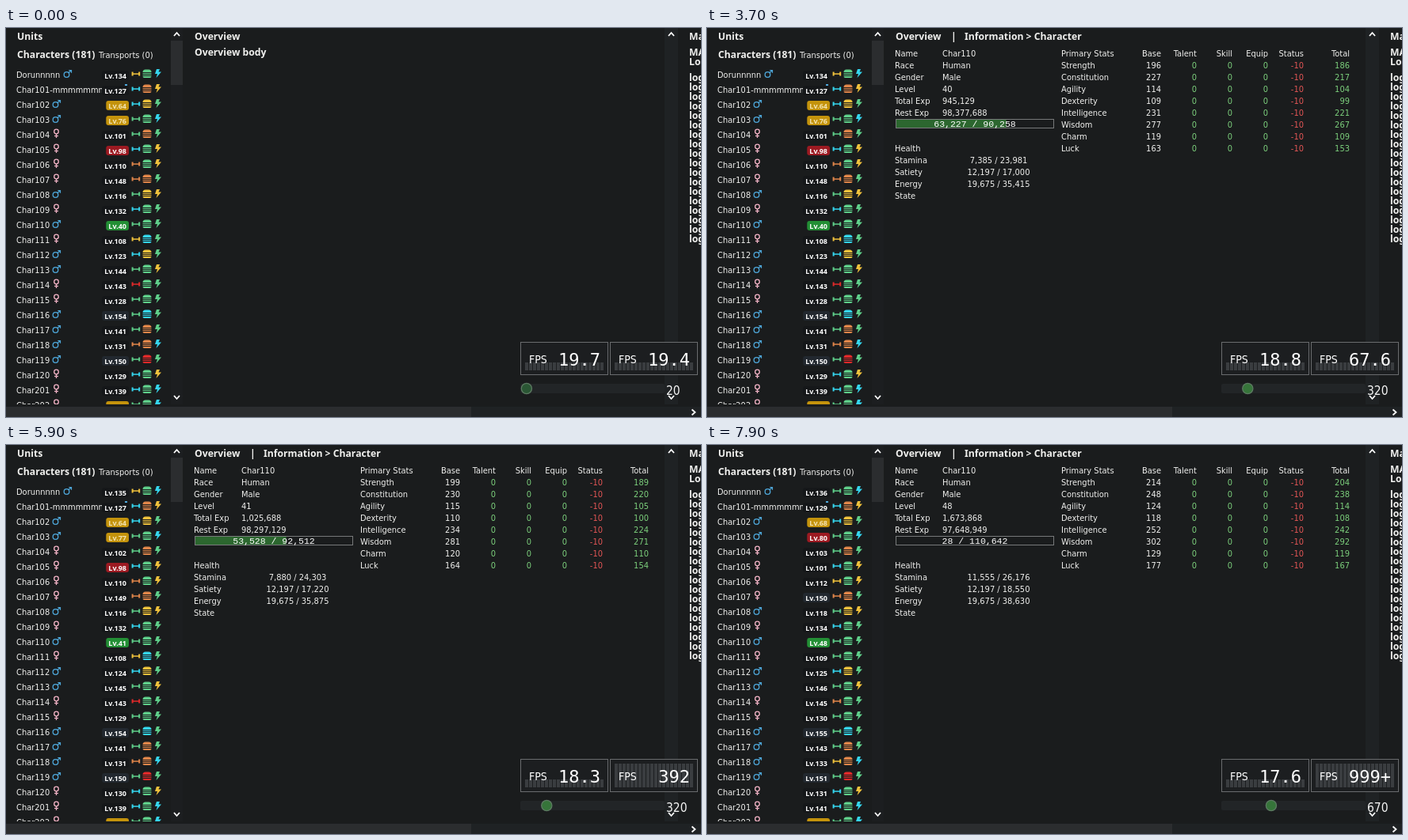
Recreate the animation shown at these times as an HTML page with a canvas. Size 877 px wide and 492 px high, loop 8 s.

```html
<!DOCTYPE html>
<html lang="en">
<head>
<meta charset="utf-8">
<title>Units overview</title>
<style>
html, body { margin: 0; width: 100%; height: 100%; overflow: hidden; background: #1a1c1d; }
canvas { display: block; }
</style>
</head>
<body>
<canvas id="stage" width="877" height="492"></canvas>
<script>
const ctx = document.getElementById('stage').getContext('2d', { alpha: false });
const LOOP = 8000, STEP = 100;
const BG = '#1a1c1d', TRACK = '#1f2224', THUMB = '#2b2d2f', LIGHT = '#f0f0ee';
const GREEN = '#7ccf7c', RED = '#e25555';
const SANS = '"DejaVu Sans Condensed", "Noto Sans", sans-serif';
const BODY = '11px ' + SANS;
const BOLD = 'bold 12.2px "Noto Sans", sans-serif';
const SMALL = 'bold 9px "Noto Sans", sans-serif';
const MONO = '22px "DejaVu Sans Mono", monospace';
const TINT = { g: '#5fcf8a', c: '#35d6ee', y: '#f0c23c', o: '#e0864a', r: '#e02a2a' };

// name, sex, level, level gains between tick keys, icon tints
const units = `Dorunnnnn m 134 1010 ygc
Char101-mmmmmmmmmm m 127 0011 coy
Char102 m 64 0022 cyg
Char103 m 76 1021 ggc
Char104 f 101 1010 gog
Char105 f 98 0021 cgy
Char106 f 110 0011 ogy
Char107 f 148 0101 oog
Char108 m 116 0011 gyy
Char109 f 132 0011 cgg
Char110 m 40 1043 ggg
Char111 f 108 0010 ycg
Char112 m 123 1010 cyg
Char113 m 144 0101 ggy
Char114 f 143 0011 rgg
Char115 f 128 1010 ggg
Char116 m 154 0010 gcg
Char117 m 141 0011 gog
Char118 m 131 0011 ooc
Char119 m 150 0010 grg
Char120 f 129 1010 cgy
Char201 f 139 0011 cgc
Char202 f 69 1011 ggc`.split('\n').map(line => {
  const [name, sex, level, gains, tints] = line.split(' ');
  let sum = +level;
  return { name, sex, tints, levels: [sum, ...[...gains].map(g => sum += +g)] };
});
const SELECTED = 10;
const rested = [[0, 120, 'ggc'], [6, 230, 'ygy'], [11, 230, 'ggg'], [14, 100, 'ogg'], [18, 110, 'yoc']]; // row, tick, tints

const tickTimes = [2800, 3300, 3700, 4600, 5900, 6300, 6700, 7200, 7900];
const tickCounts = [0, 1, 2, 15, 35, 41, 83, 165, 280];
const tickKeys = [0, 15, 35, 165, 280];
const expKeys = [940323, 976368, 1025688, 1358396, 1673868];
const START_EXP = 881902, ALL_EXP = 99322817;
const caps = [90258, 92512, 94800, 97000, 99260, 103733, 106000, 108375, 110642];
const levelKeys = [40, 41, 45, 48];
const stats = {
  Strength: [196, 199, 207, 214], Constitution: [227, 230, 240, 248],
  Agility: [114, 115, 120, 124], Dexterity: [109, 110, 115, 118],
  Intelligence: [231, 234, 244, 252], Wisdom: [277, 281, 293, 302],
  Charm: [119, 120, 125, 129], Luck: [163, 164, 172, 177]
};
const maxima = [[23981, 24303, 25334, 26176], [17000, 17220, 17955, 18550], [35415, 35875, 37405, 38630]];

function lerp(x, xs, ys) {
  if (x <= xs[0]) return ys[0];
  const i = xs.findIndex(k => x <= k);
  if (i < 0) return ys[ys.length - 1];
  return ys[i - 1] + (ys[i] - ys[i - 1]) * (x - xs[i - 1]) / (xs[i] - xs[i - 1]);
}
const round = (x, xs, ys) => Math.round(lerp(x, xs, ys));
const comma = n => n.toLocaleString('en-US');

function text(s, x, y, color = LIGHT, font = BODY, align = 'left') {
  ctx.font = font;
  ctx.textAlign = align;
  ctx.fillStyle = color;
  ctx.fillText(s, x, y);
}
function rect(x, y, w, h, color) {
  ctx.fillStyle = color;
  ctx.fillRect(x, y, w, h);
}
function rounded(x, y, w, h, r, color) {
  ctx.fillStyle = color;
  ctx.beginPath();
  ctx.roundRect(x, y, w, h, r);
  ctx.fill();
}
function trace(points, color, width) {
  ctx.strokeStyle = color;
  ctx.lineWidth = width;
  ctx.beginPath();
  points.forEach(([x, y], i) => i ? ctx.lineTo(x, y) : ctx.moveTo(x, y));
  ctx.stroke();
}
function ring(x, y, r, color) {
  ctx.strokeStyle = color;
  ctx.lineWidth = 1.3;
  ctx.beginPath();
  ctx.arc(x, y, r, 0, 7);
  ctx.stroke();
}
function frame(x, y, w, h, color) {
  ctx.strokeStyle = color;
  ctx.lineWidth = 1;
  ctx.strokeRect(x + .5, y + .5, w - 1, h - 1);
}
const chevron = (x, y, d) => trace([[x - 3.5, y - 2 * d], [x, y + 2 * d], [x + 3.5, y - 2 * d]], '#fff', 1.8);

function sexSign(sex, x, y) {
  if (sex === 'm') {
    const blue = '#4fa9dc';
    ring(x - 1, y + 1, 3.3, blue);
    trace([[x + 1.3, y - 1.3], [x + 5, y - 4.5]], blue, 1.3);
    trace([[x + 1.8, y - 4.5], [x + 5, y - 4.5], [x + 5, y - 1.3]], blue, 1.2);
  } else {
    const pink = '#f3b3c6';
    ring(x, y - 3, 2.8, pink);
    trace([[x, y], [x, y + 5]], pink, 1.3);
    trace([[x - 2.5, y + 2.5], [x + 2.5, y + 2.5]], pink, 1.2);
  }
}
function badge(level, y) {
  const label = 'Lv.' + level;
  const fill = level < 60 ? '#238f35' : level < 80 ? '#c4930c' : level < 100 ? '#9c1a22'
    : level < 150 ? '#151719' : '#22282f';
  ctx.font = SMALL;
  const w = ctx.measureText(label).width + 6;
  rounded(155 - w, y - 5, w, 12, 3, fill);
  text(label, 158 - w, y + 4.5, level >= 60 && level < 80 ? '#f3e3b0' : '#fff', SMALL);
}
function icons(tints, y) {
  const [bar, burger, bolt] = [...tints].map(k => TINT[k]);
  rect(160, y - 1.7, 8, 1.5, bar);
  rect(158.6, y - 3.5, 2, 5, bar);
  rect(167.2, y - 3.5, 2, 5, bar);
  rounded(172.5, y - 6.5, 11, 3.5, [4, 4, 0, 0], burger);
  rect(172.5, y - 2, 11, 1, burger);
  rect(172.5, y, 11, 1, burger);
  rounded(172.5, y + 2, 11, 2, [0, 0, 2, 2], burger);
  ctx.fillStyle = bolt;
  ctx.beginPath();
  [[190, -7], [194, -7], [192.5, -3.5], [196, -3.5], [189.5, 4], [191, -1], [188, -1]]
    .forEach(([x, dy]) => ctx.lineTo(x, y + dy));
  ctx.fill();
}

function hoveredRow(t) {
  if (t < 400 || t >= 2800) return -1;
  if (t < 900) return 4;
  return t < 1400 ? 5 : Math.min(SELECTED, 6 + Math.floor((t - 1400) / 100));
}
function unitList(t, tick, level) {
  text('Units', 14, 15, LIGHT, BOLD);
  text('Characters (181)', 14, 38, LIGHT, BOLD);
  text('Transports (0)', 117, 38);
  const hover = hoveredRow(t);
  units.forEach((u, i) => {
    const y = 59 + 19 * i;
    if (i === hover) rect(9, y - 9, 194, 18, '#131516');
    text(u.name, 13, y + 4);
    if (i === 1) {
      rect(121, y - 9, 84, 18, BG);
      rect(150, y - 7, 3, 2, '#4fa9dc');
    } else sexSign(u.sex, i ? 63.5 : 77.5, y - 1);
    badge(i === SELECTED ? level : round(tick, tickKeys, u.levels), y);
    const change = rested.find(r => r[0] === i && tick >= r[1]);
    icons(change ? change[2] : u.tints, y);
  });
}

function character(tick, total, level, exp, cap) {
  text('|', 308, 15, LIGHT, BOLD);
  text('Information > Character', 325, 15, LIGHT, BOLD);
  const facts = {
    Name: 'Char110', Race: 'Human', Gender: 'Male', Level: level,
    'Total Exp': comma(total), 'Rest Exp': comma(ALL_EXP - total)
  };
  Object.entries(facts).forEach(([k, v], i) => {
    text(k, 237, 36 + 15 * i);
    text(v, 297, 36 + 15 * i);
  });
  rect(239, 115, 198 * exp / cap, 12, '#2c672f');
  frame(238, 115, 200, 12, '#77797a');
  text(`${comma(exp)} / ${comma(cap)}`, 338, 124.5, '#fff', '11.5px "Liberation Mono", monospace', 'center');

  ['Health', 'Stamina', 'Satiety', 'Energy', 'State'].forEach((s, i) => text(s, 237, 156 + 15 * i));
  [7355 + 15 * tick, 12197, 19675].forEach((v, i) =>
    text(`${comma(v)} / ${comma(round(level, levelKeys, maxima[i]))}`, 368, 171 + 15 * i, LIGHT, BODY, 'center'));

  const right = [573, 618, 663, 708, 753, 811];
  const row = (cells, y, colors) => cells.forEach((c, i) => text(c, right[i], y, colors[i], BODY, 'right'));
  text('Primary Stats', 447, 36);
  row(['Base', 'Talent', 'Skill', 'Equip', 'Status', 'Total'], 36, []);
  Object.entries(stats).forEach(([k, v], i) => {
    const base = round(level, levelKeys, v), y = 51 + 15 * i;
    text(k, 447, y);
    row([base, 0, 0, 0, -10, base - 10], y, [LIGHT, GREEN, GREEN, GREEN, RED, GREEN]);
  });
}

function meter(x, fps, tall) {
  rect(x, 397, 111, 42, '#1c1e20');
  frame(x, 397, 111, 42, '#6a6c6e');
  for (let i = 0; i < 20; i++) {
    const h = i >= 20 - tall ? 30 : 10;
    rect(x + 6 + 5 * i, 433 - h, 4, h, '#3a3d40');
  }
  text('FPS', x + 11, 423.5, '#fff', '14px ' + SANS);
  const label = fps >= 1000 ? '999+' : fps >= 100 ? Math.round(fps) : fps.toFixed(1);
  text(label, x + 101, 427, '#fff', MONO, 'right');
}
function controls(t) {
  meter(649, lerp(t, [0, 1300, 2600, 4600, 5900, 7200, 7900], [19.7, 19.6, 19.5, 18.3, 18.3, 19.3, 17.6]), 0);
  meter(762, lerp(t, [0, 700, 1300, 2600, 3500, 4600, 5900, 6400, 7000],
    [19.4, 19.7, 19.6, 19.5, 22, 273, 392, 420, 1000]), Math.floor((t - 4000) / 95));
  const speed = 10 * Math.round(lerp(t, [2900, 3600, 6200, 6700], [20, 320, 320, 670]) / 10);
  const knob = 655.2 + speed * .0847;
  rounded(649, 450, 182, 12, 2, '#222527');
  ctx.fillStyle = t < 2800 ? '#2a5634' : '#36753a';
  ctx.beginPath();
  ctx.arc(knob, 456, 6.6, 0, 7);
  ctx.fill();
  ring(knob, 456, 6.6, '#5d7a62');
  text(speed, 833, 464, '#f4f4f4', '15.5px ' + SANS);
}

function draw(t) {
  const tick = Math.floor(lerp(t, tickTimes, tickCounts));
  const total = round(tick, tickKeys, expKeys);
  let exp = total - START_EXP, n = 0;
  while (exp >= caps[n] && n < caps.length - 1) exp -= caps[n++];
  const level = 40 + n;

  rect(0, 0, 877, 492, BG);
  unitList(t, tick, level);
  rect(0, 476, 877, 16, BG);

  rect(208, 0, 15, 476, '#1c1e20');
  rect(208, 16, 15, 56, THUMB);
  chevron(215.5, 8, -1);
  chevron(215.5, 467, 1);
  rect(831, 0, 17, 476, TRACK);
  chevron(839.5, 8, -1);
  chevron(839.5, 467, 1);
  rect(0, 479, 877, 13, TRACK);
  rect(0, 479, 587, 13, THUMB);
  trace([[865.5, 482.5], [869.5, 486], [865.5, 489.5]], '#fff', 1.8);

  text('Overview', 238, 15, LIGHT, BOLD);
  if (t < 2000) text('Overview body', 238, 35, LIGHT, BOLD);
  else character(tick, total, level, exp, caps[n]);

  text('Main', 862, 15, LIGHT, BOLD);
  text('MAIN', 862, 35, LIGHT, BOLD);
  text('Log', 862, 47, LIGHT, BOLD);
  for (let i = 0; i < 18; i++) text('log', 862, 67 + 12 * i, LIGHT, BOLD);
  controls(t);
}

const start = performance.now();
function loop(now) {
  const t = Math.max(0, now - start) % LOOP;
  draw(Math.floor(t / STEP) * STEP);
  requestAnimationFrame(loop);
}
draw(0);
requestAnimationFrame(loop);
</script>
</body>
</html>
```
